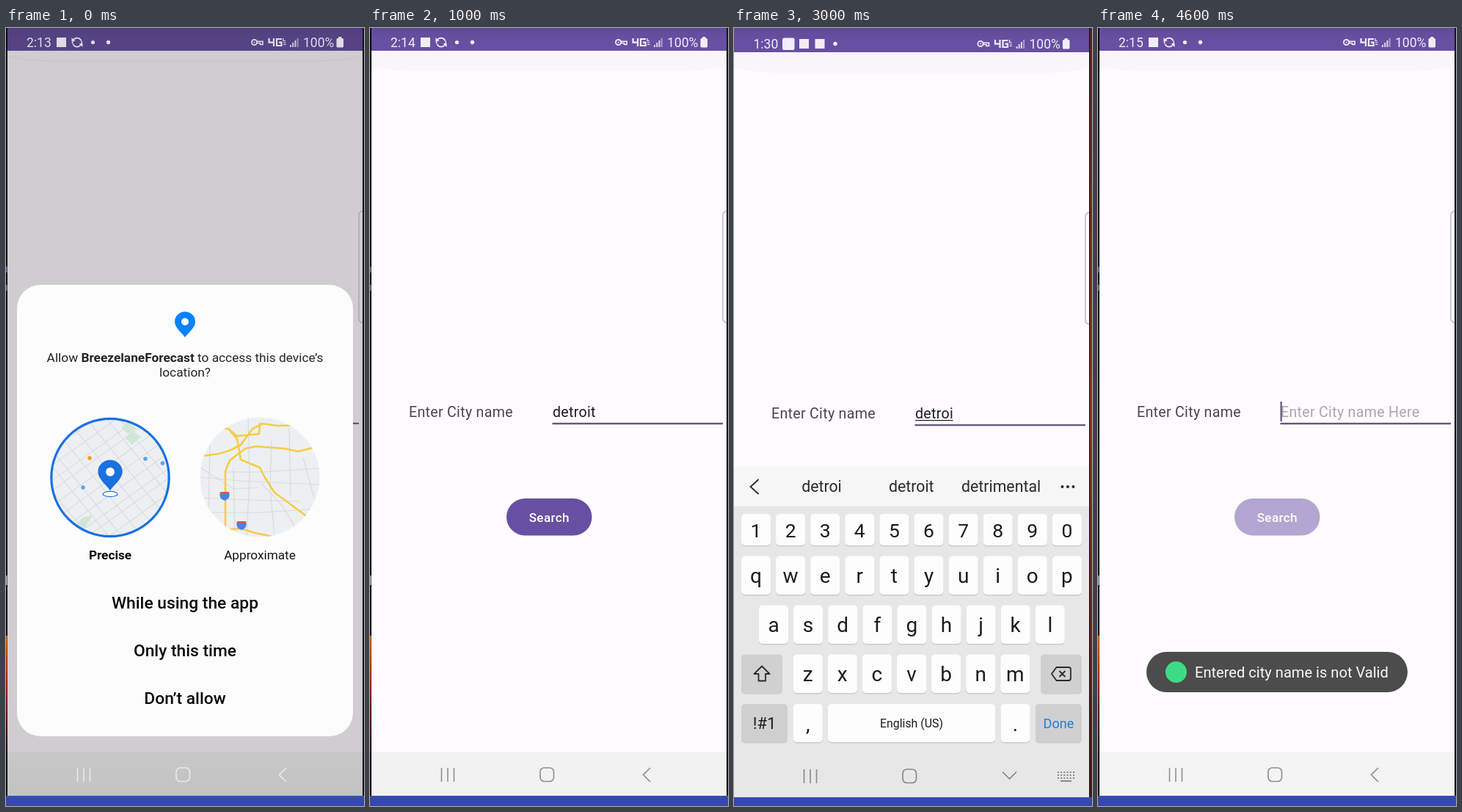
Write an HTML page that moves like this. It is 488x1060 px and loops after 5000 ms.

```html
<!DOCTYPE html>
<html lang="en">
<head>
<meta charset="utf-8">
<title>Weather search</title>
<style>
html, body { margin: 0; width: 100%; height: 100%; overflow: hidden; background: #fefbff; }
svg { display: block; width: 488px; height: 1060px; font-family: Roboto, "Noto Sans", sans-serif; }
</style>
</head>
<body>
<svg id="stage" viewBox="0 0 488 1060" xmlns="http://www.w3.org/2000/svg">
  <defs>
    <linearGradient id="bar" x2="0" y2="1"><stop stop-color="#604a97"/><stop offset=".5" stop-color="#6750a2"/></linearGradient>
    <linearGradient id="barDim" x2="0" y2="1"><stop stop-color="#503f7c"/><stop offset=".5" stop-color="#554384"/></linearGradient>
    <linearGradient id="navDim" x2="0" y2="1"><stop stop-color="#c8c7c8"/><stop offset="1" stop-color="#c2c3c3"/></linearGradient>
    <linearGradient id="navTint" x2="0" y2="1"><stop stop-color="#f7f3fb"/><stop offset=".5" stop-color="#f2f2f2"/></linearGradient>
    <linearGradient id="ember" x2="0" y2="1"><stop stop-color="#d9791c"/><stop offset=".4" stop-color="#a8381c"/><stop offset="1" stop-color="#2a0b0c"/></linearGradient>
    <linearGradient id="rust" x2="0" y2="1"><stop stop-color="#5a2418"/><stop offset=".5" stop-color="#8a3a20"/><stop offset="1" stop-color="#4a1a14"/></linearGradient>
    <clipPath id="leftMap"><circle cx="142" cy="612.5" r="81"/></clipPath>
    <clipPath id="rightMap"><circle cx="346" cy="612" r="81.5"/></clipPath>
  </defs>
</svg>
<script>
const stage = document.getElementById('stage');
const HOLD = 1000;

const rect = (x, y, w, h, fill, r = 0, extra = '') =>
  `<rect x="${x}" y="${y}" width="${w}" height="${h}" rx="${r}" fill="${fill}" ${extra}/>`;
const circle = (x, y, r, fill, extra = '') =>
  `<circle cx="${x}" cy="${y}" r="${r}" fill="${fill}" ${extra}/>`;
const line = (d, stroke, width, extra = '') =>
  `<path d="${d}" fill="none" stroke="${stroke}" stroke-width="${width}" ${extra}/>`;
const text = (x, y, size, str, fill = '#49454f', extra = '') =>
  `<text x="${x}" y="${y}" font-size="${size}" fill="${fill}" ${extra}>${str}</text>`;
const mid = (x, y, size, str, fill, extra = '') =>
  text(x, y, size, str, fill, 'text-anchor="middle" ' + extra);
const move = (x, y, body) => `<g transform="translate(${x} ${y})">${body}</g>`;
const spaced = 'letter-spacing=".3"';
const medium = 'font-weight="500" ';

function statusRight(ink) {
  const signal = [0, 1, 2, 3].map(i =>
    rect(387 + i * 3.2, 23 - i * 3, 2, 3 + i * 3, ink, 0, `opacity="${i < 3 ? .85 : .5}"`)).join('');
  return circle(338.5, 19.5, 3.6, 'none', `stroke="${ink}" stroke-width="1.8"`) + circle(338.5, 19.5, 1, ink) +
    line('M342 18.2H350V22.5H346.5V20.5H342', ink, 1.6) +
    line('M358.5 14V19.7H365.5M365 14V25M376 15H369V24H375.5V19.7H372', ink, 2.2) +
    line('M378 14V17.5H381M378 20H381.5M378 22.5H381.5', ink, 1.2) +
    signal + text(405, 25.7, 17.5, '100%', ink) +
    rect(450.5, 14, 9.5, 12.5, ink, 1.5) + rect(453, 12, 4.5, 3, ink, .8);
}

function syncIcon(ink) {
  return line('M91.5 17A6 6 0 0 1 102.5 17.5M102.5 22A6 6 0 0 1 91.5 22', ink, 1.8) +
    line('M91 21.5A6 6 0 0 1 91.5 16M103 17.5A6 6 0 0 1 102.5 23', ink, 1.5) +
    `<path d="M89.5 13V18H94.5ZM104.5 26V21H99.5Z" fill="${ink}"/>`;
}

function statusBar(time, dim) {
  const ink = dim ? '#dedbe5' : '#f1eef7';
  return rect(0, 0, 488, 31, dim ? 'url(#barDim)' : 'url(#bar)') +
    text(28, 25.7, 17.5, time, ink) + rect(69, 13, 13, 13, ink) + syncIcon(ink) +
    circle(118.5, 19.5, 2.6, ink) + circle(139.5, 19.5, 2.7, ink) + statusRight(ink);
}

const recents = ink => line('M97.5 1008V1027M106 1008V1027M114.500 1008V1027', ink, 1.6);
const home = ink => rect(232, 1008, 18.500, 18.500, 'none', 5.5, `stroke="${ink}" stroke-width="1.7"`);

function navBar(fill, ink) {
  return rect(0, 986, 488, 60, fill) + recents(ink) + home(ink) +
    line('M382 1008L372.500 1017.5L382 1027', ink, 1.7);
}

const footer = y => rect(0, y, 488, 14, '#3549ad') + rect(0, y, 488, 1.5, '#3f52b4');

function handle(fill, stroke) {
  return rect(481, 249.5, 20, 152, fill, 5, `stroke="${stroke}" stroke-width="1.5"`);
}

function edges() {
  return rect(0, 0, 2, 1046, '#0b0910') + rect(486, 0, 2, 1046, '#18131b') +
    rect(0, 325, 1.5, 8, '#7b70b5') + rect(0, 350, 1.5, 8, '#7b70b5') +
    rect(0, 746, 1.5, 13, '#b9b6bc') + rect(0, 828, 1.6, 160, 'url(#ember)');
}

const topShade = '<path d="M0 31H488V51Q468 58 430 59H58Q20 58 0 51Z" fill="#f9f5fb"/>';

function screen(time, nav, body) {
  return rect(0, 0, 488, 1060, '#fefbff') + topShade + handle('#fffdff', '#b9b5bb') + body +
    navBar(nav, '#8f8f8f') + statusBar(time) + edges() + footer(1046);
}

const label = text(53, 530, 19.6, 'Enter City name', '#49454f', spaced);
const underline = rect(248.5, 537.8, 232.5, 2.4, '#605a7d');
const button = (x, y, w, str, fill) => rect(x, y, w, 50.5, fill, 25.25) +
  mid(x + w / 2, y + 32.2, 17.2, str, '#fff', medium + spaced);

const pin = (x, y, s, fill) => `<g transform="translate(${x} ${y}) scale(${s})">
  <path d="M0 35C-3 30-14 22-14 13.700A14 13.700 0 0 1 14 13.700C14 22 3 30 0 35Z" fill="${fill}"/>
  ${circle(0, 13.7, 5, '#fff')}</g>`;

function preciseMap() {
  let streets = '';
  for (let i = -6; i <= 6; i++) {
    const p = i * 15 + (i % 3) * 2;
    streets += `M-110 ${p}L110 ${p + 5}M${p * 1.25} -110L${p * 1.25 + 8} 110`;
  }
  const dots = [[114, 586, '#f0a020'], [190, 587, '#5aa2f0'], [213.5, 593, '#5aa2f0'], [105, 626, '#5aa2f0']]
    .map(([x, y, c]) => circle(x, y, 2.8, c)).join('');
  return `<g clip-path="url(#leftMap)">${rect(60, 530, 165, 165, '#edf0f2')}
    <path d="M162 558L173 549L184 557L172 568ZM166 536L178 546L166 553L157 544ZM91 682L104 667L119 663L101 690Z" fill="#cfe8d5"/>
    <g transform="translate(142 612) rotate(-37)">${line(streets, '#dadde1', 1.2)}</g>${dots}</g>` +
    circle(142, 612.5, 80.2, 'none', 'stroke="#1b70e2" stroke-width="3.2"') +
    '<ellipse cx="142" cy="635" rx="10" ry="3.6" fill="#fff" stroke="#1b70e2" stroke-width="1.2"/>' +
    pin(142, 588.5, 1.19, '#1b70e2');
}

function approximateMap() {
  const minor = 'M264 612L320 617L428 622M264 640L330 643L400 645M270 660H350L428 655M330 530L332 612L328 694' +
    'M362 560L360 626L366 694M386 545L388 640M278 565L276 670M310 600L312 690M300 605H350L428 600' +
    'M348 620L376 650L400 690M264 598L310 628L345 626M405 585L420 640';
  const major = 'M282 545L303 546L315 556L345 553L346 538M299 694L299 604L305 589L326 573L341 570L380 573L398 577L418 572' +
    'M303 546L315 560L320 588L346 599L352 611L366 633L411 666' +
    'M262 584L290 580L304 576L320 568L336 546L350 539L370 542L399 541M268 678L286 684L320 682L340 688L364 693';
  const sign = (x, y) => `<path d="M${x - 6} ${y - 5}H${x + 6}Q${x + 9} ${y + 4} ${x} ${y + 7}Q${x - 9} ${y + 4} ${x - 6} ${y - 5}Z" fill="#4285e8"/>` +
    rect(x - 6, y - 5, 12, 3, '#d9574f');
  return `<g clip-path="url(#rightMap)">${rect(264, 530, 165, 165, '#edf0f2')}
    ${line(minor, '#d8dbdf', 1.2)}${line(major, '#f8cb46', 2.6, 'stroke-linejoin="round"')}
    ${sign(298, 637)}${sign(321, 677)}</g>`;
}

function permission() {
  const choice = (y, str) => mid(244, y, 22.8, str, '#080808', medium);
  return rect(0, 0, 488, 1060, '#d0cdd0') +
    line('M2 38Q25 45 70 45H418Q463 45 486 38', '#c7c3c8', 1) +
    handle('#d0cdd0', '#aaa7aa') + rect(473, 537.8, 8, 1.8, '#49454f') +
    navBar('url(#navDim)', '#e9e9e9') + statusBar('2:13', true) + edges() + footer(1046) +
    rect(15, 350, 458, 615, '#fcfcfc', 32) + pin(244, 386.5, 1, '#0a82fd') +
    mid(244, 455, 17.3, 'Allow <tspan font-weight="700">BreezelaneForecast</tspan> to access this device’s', '#252525') +
    mid(244, 475, 17.3, 'location?', '#252525') + preciseMap() + approximateMap() +
    mid(142, 723.7, 17.2, 'Precise', '#080808', 'font-weight="700"') +
    mid(346, 723.7, 17.2, 'Approximate', '#151515') +
    choice(790.5, 'While using the app') + choice(855.5, 'Only this time') + choice(921, 'Don’t allow');
}

function weather() {
  const value = (x, y, str) => mid(x, y, 22.3, str, '#49454f', spaced);
  return circle(100, 313.5, 47.500, '#ec6e4c', 'stroke="#eba18b" stroke-width="1"') +
    value(244.5, 244.7, '84 F') + value(244.5, 349.5, '29 C') +
    value(390, 244.7, 'Detroit') + value(389.5, 336.5, 'clear sky') +
    button(161, 536, 167, 'Search Again', '#6750a2');
}

function key(x, y, w, h, str = '', size = 28, base = h / 2 + 10, fill = '#fdfdfe', ink = '#1c1c1e') {
  return rect(x, y + 1.5, w, h, '#cbcbcd', 5) + rect(x, y, w, h, fill, 5) +
    mid(x + w / 2, y + base, size, str, ink);
}

function keyboard() {
  const row = (chars, x, y, h, size) =>
    [...chars].map((c, i) => key(x + i * 47.1, y, 40, h, c, size)).join('');
  const grey = '#d0d0d1';
  return rect(0, 597, 488, 55, '#f6f6f7') + rect(0, 651.5, 488, 397, '#e7e7e8') +
    line('M33.500 615L22.500 625L33.500 635', '#2a2a2c', 1.8) +
    ['detroi', 'detroit', 'detrimental'].map((w, i) => mid(119.5 + i * 122.3, 632, 21.3, w, '#2a2a2c')).join('') +
    [447.5, 455, 462.5].map(x => circle(x, 625, 2, '#2a2a2c')).join('') +
    row('1234567890', 10, 662, 43, 26.5) + row('qwertyuiop', 10, 719.5, 52.5) +
    row('asdfghjkl', 34, 786.5, 52.5) + row('zxcvbnm', 80.7, 853.5, 52.5) +
    key(10, 853.5, 56, 52.5, '', 0, 0, grey) + key(418, 853.5, 56, 52.5, '', 0, 0, grey) +
    line('M38 869.500L48.500 880H43V889.500H33.500V880H27.500Z', '#2a2a2c', 1.8, 'stroke-linejoin="round"') +
    line('M433 880L439.500 871H456Q459 871 459 874V886Q459 889 456 889H439.500ZM443.500 876L451.500 884M451.500 876L443.500 884', '#2a2a2c', 1.8, 'stroke-linejoin="round"') +
    key(10, 921, 63, 52, '!#1', 22, 34, grey) + key(80.7, 921, 40, 52, ',', 28, 37) +
    key(128, 921, 228, 52, 'English (US)', 15.9, 31.5) + key(363.5, 921, 40, 52, '.', 28, 37) +
    key(411, 921, 63, 52, 'Done', 18.2, 33, grey, '#1a7fe0');
}

function keyboardNav() {
  let dots = '';
  for (let r = 0; r < 3; r++)
    for (let c = 0; c < 6; c++) dots += rect(441 + c * 4.2, 1013 + r * 4, 2, 2, '#88888a');
  return move(-2, 2, recents('#88888a') + home('#88888a')) +
    line('M366 1013.5L375.500 1023L385 1013.5', '#88888a', 1.7) + dots + rect(445, 1025, 15, 2, '#88888a');
}

function typing() {
  const ink = '#f1eef7';
  return rect(0, 0, 488, 1060, '#fefbff') + move(-2, 2, topShade + handle('#fffdff', '#b9b5bb') + label + underline) +
    text(247, 532, 19.6, 'detroi', '#1c1b1f', spaced) + rect(247, 534, 51.5, 1.2, '#1c1b1f') +
    keyboard() + keyboardNav() + rect(0, 0, 488, 33, 'url(#bar)') +
    text(26.5, 27.7, 17.5, '1:30', ink) + rect(66, 13.5, 16.500, 16.500, ink, 2) +
    rect(89, 15, 13, 13, ink) + rect(110.5, 15, 13, 13, ink) + circle(138, 21.5, 2.7, ink) +
    move(-2.5, 2, statusRight(ink)) +
    rect(484, 0, 4, 1048, 'url(#rust)') + rect(484, 0, 1.2, 1048, '#1d1216') + footer(1048);
}

const toast = rect(66, 850, 356, 55, '#4c4c4c', 27.5) + circle(106.5, 877.5, 14.5, '#3ddc84') +
  text(132, 884.7, 20.1, 'Entered city name is not Valid', '#f8f8f8');

const scenes = [
  permission(),
  screen('2:14', '#f2f2f2', label + text(249, 530, 19.6, 'detroit', '#1c1b1f', spaced) + underline +
    button(186, 641, 116.5, 'Search', '#6750a2')),
  screen('2:14', 'url(#navTint)', weather()),
  typing(),
  screen('2:15', '#f4f4f5', label + text(249, 530, 19.6, 'Enter City name Here', '#aaa6ad', spaced) +
    rect(248.5, 509, 2.3, 27, '#605a7d') + underline + button(186, 641, 116.5, 'Search', '#b3a7d1') + toast)
];

stage.insertAdjacentHTML('beforeend', scenes.map(s => `<g display="none">${s}</g>`).join(''));
const groups = [...stage.children].slice(1);

function render(ms) {
  const current = Math.floor(ms / HOLD) % groups.length;
  groups.forEach((g, i) => g.setAttribute('display', i === current ? 'inline' : 'none'));
}

function tick() {
  render(performance.now());
  requestAnimationFrame(tick);
}
tick();
</script>
</body>
</html>
```
